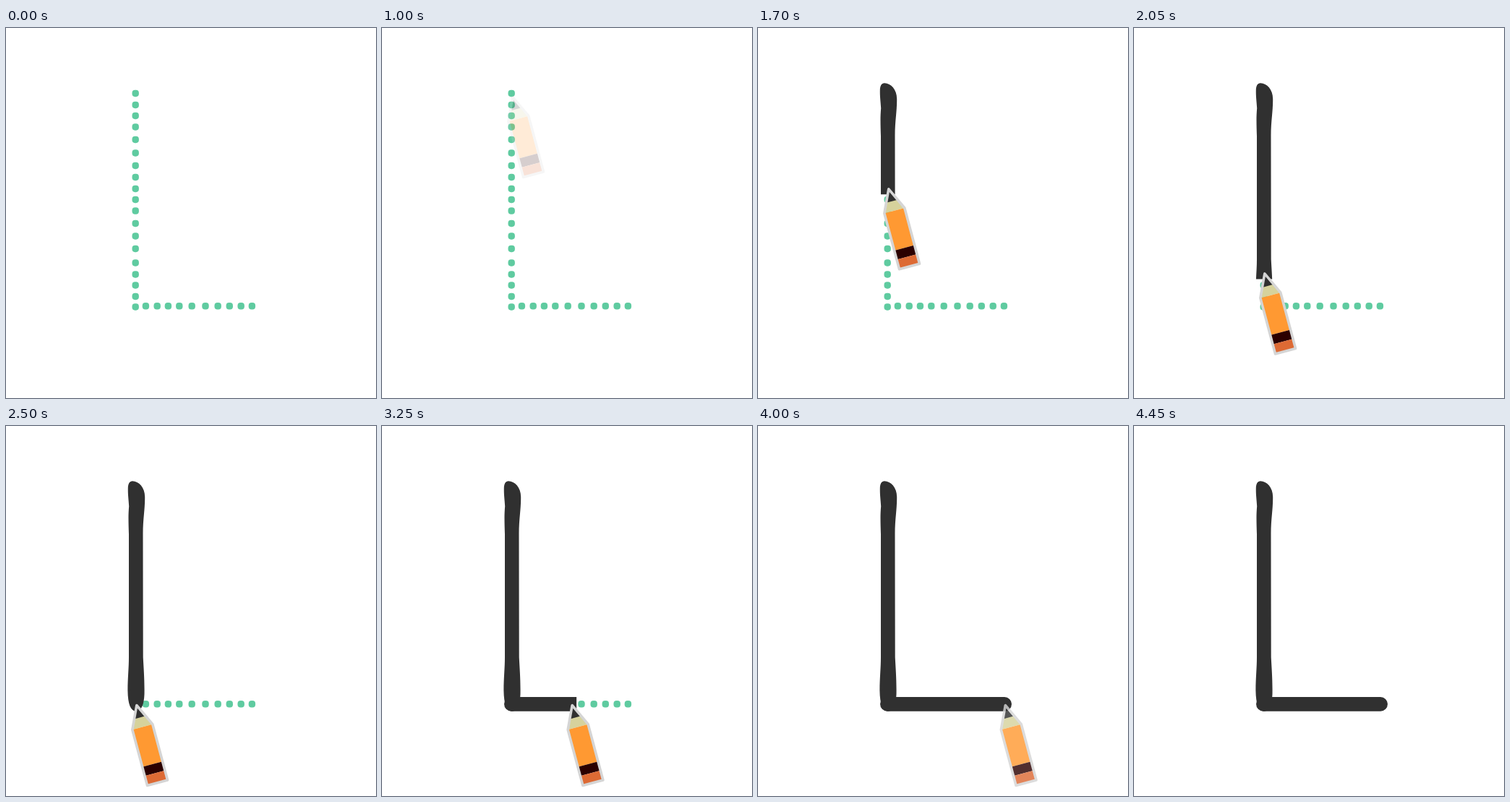
Animation of 512x512 px, one loop 5.5 s. Source, as an HTML page:

```html
<!DOCTYPE html>
<html lang="en">
<head>
<meta charset="utf-8">
<title>Tracing the letter L</title>
<style>
  html, body { margin: 0; width: 100%; height: 100%; overflow: hidden; background: #fff; }
  svg { display: block; width: 100%; height: 100%; }
</style>
</head>
<body>
<svg viewBox="0 0 512 512">
  <defs>
    <clipPath id="downClip"><rect id="downCut" width="512" height="0"/></clipPath>
    <clipPath id="acrossClip"><rect id="acrossCut" width="0" height="512"/></clipPath>
  </defs>
  <g id="dots" fill="#5fcba0"></g>
  <g fill="#303030">
    <path clip-path="url(#downClip)" d="M175 76.3C184 76.5 192 85 192.2 98C192.4 116 189.4 128 189.5 150
      L189.7 320C190.5 336 191.8 350 191.5 371C191 384 188 394.5 180 394.8C172.5 394.5 168.7 385 168.4 366
      C168.4 348 170 335 170 320L170 150C169.3 130 169.3 122 170.2 111C169.5 100 168.6 95 168.8 86
      C168.9 80 171 76.3 175 76.3Z"/>
    <rect clip-path="url(#acrossClip)" x="169" y="375" width="182" height="19.7" rx="9.85"/>
  </g>
  <g id="pencil">
    <path fill="#d6d29c" d="M0 0L13.5 31H-13.5Z"/>
    <path fill="#303030" d="M0 0L7 17.5H-7Z"/>
    <path fill="#ff9932" d="M-13.5 31h27v53.3h-27z"/>
    <path fill="#2b0000" d="M-13.5 84.3h27v13h-27z"/>
    <path fill="#dd6a34" d="M-13.5 97.3h27v13.5h-27z"/>
    <path fill="none" stroke="#d5d5d5" stroke-width="3.6" stroke-linejoin="round"
      d="M0 0L14.5 31V111H-14.5V31Z"/>
  </g>
</svg>
<script>
const LOOP = 5500, STEP = 50, FADE = 500, DRAW = 1000;
const FADE_IN = 950, DOWN = 1450, ACROSS = 2950, FADE_OUT = 3950;
const tip = { x: 180.8, y: 95.5, right: 161.5, down: 291 };
const byId = id => document.getElementById(id);

const downDots = [90.5, 106.5, 121.5, 137, 154.5, 173, 190.5, 206.5, 222.5, 237.5,
  253, 270.5, 288, 305.5, 325, 341, 356, 371.5, 386];
const acrossDots = [193.4, 209.2, 224.4, 239.8, 257.2, 276, 293.2, 309.3, 325.2, 340.4];

function addDot(x, y) {
  const dot = document.createElementNS(byId('dots').namespaceURI, 'rect');
  const box = { x: x - 4.7, y: y - 4.7, width: 9.4, height: 9.4, rx: 4.1 };
  for (const key in box) dot.setAttribute(key, box[key]);
  byId('dots').append(dot);
}
downDots.forEach(y => addDot(179.2, y));
acrossDots.forEach(x => addDot(x, 384.8));

// Quadratic ease-out from 0 to 1
function ease(time, start, length) {
  const p = Math.min(1, Math.max(0, (time - start) / length));
  return 1 - (1 - p) ** 2;
}

// Extent of a stroke's reveal: nothing, up to the pencil, then everything
function cut(time, start, edge) {
  if (time < start) return 0;
  return time > start + DRAW ? 512 : edge;
}

function draw(time) {
  const x = tip.x + tip.right * ease(time, ACROSS, DRAW);
  const y = tip.y + tip.down * ease(time, DOWN, DRAW);
  const alpha = ease(time, FADE_IN, FADE) - ease(time, FADE_OUT, FADE);
  byId('pencil').setAttribute('transform', `translate(${x} ${y}) rotate(-15)`);
  byId('pencil').setAttribute('opacity', alpha);
  byId('downCut').setAttribute('height', cut(time, DOWN, y + 7.5));
  byId('acrossCut').setAttribute('width', cut(time, ACROSS, x + 6));
}

const origin = performance.now();
function tick() {
  const time = (performance.now() - origin) % LOOP;
  draw(Math.floor(time / STEP) * STEP);
  requestAnimationFrame(tick);
}
tick();
</script>
</body>
</html>
```
